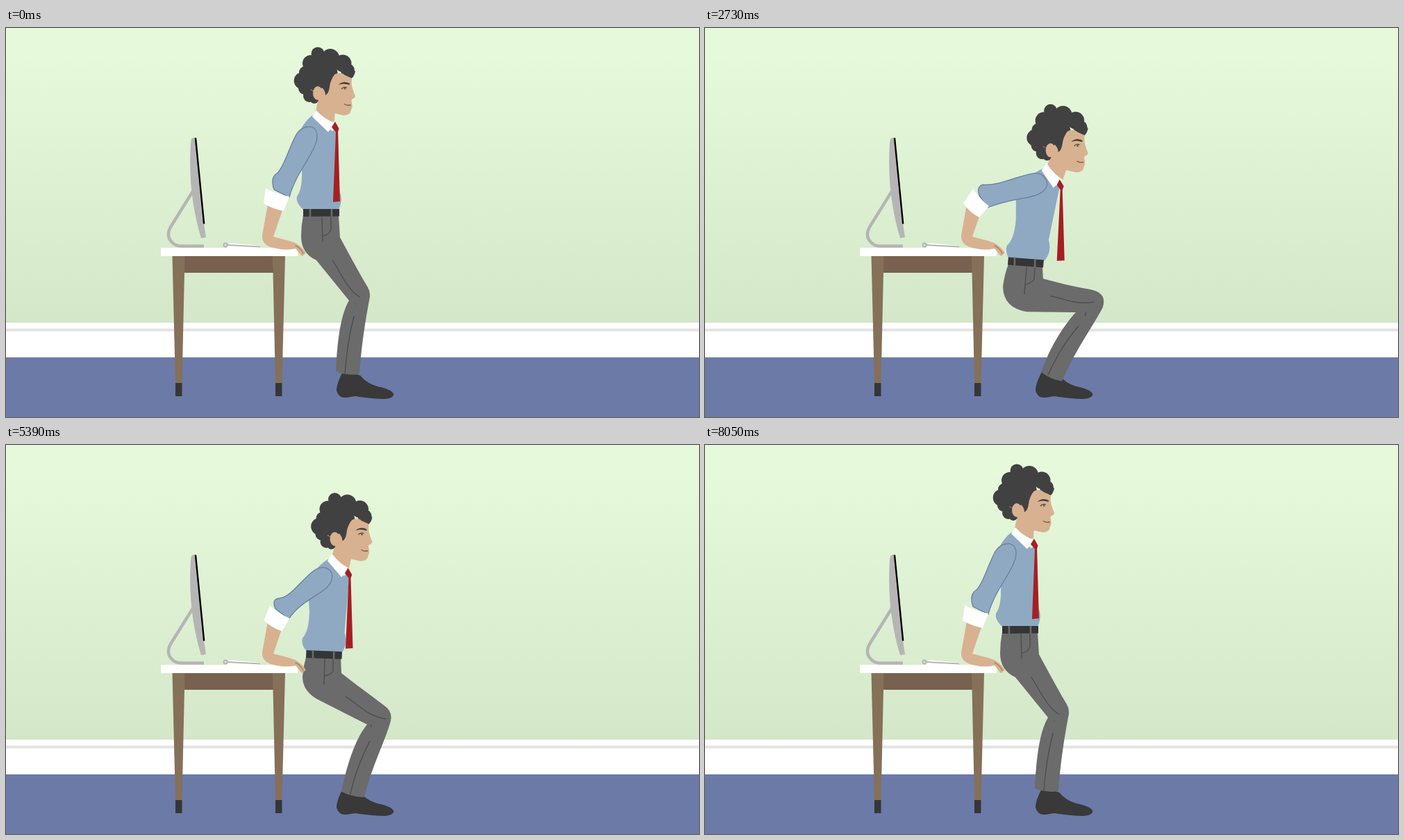
Recreate the animation shown at these times as an HTML page. Size 998 by 561 pixels, loop 8260 ms.

```html
<!DOCTYPE html>
<html lang="en">
<head>
<meta charset="utf-8">
<title>Desk dips</title>
<style>
  html, body { margin: 0; width: 100%; height: 100%; overflow: hidden; }
  svg { display: block; width: 998px; height: 561px; }
  .skin { fill: #d8b190; }
  .hair { fill: #424142; }
  .white { fill: #fff; }
  .shirt { fill: #8fa9c3; }
  .sleeve { fill: #8fa9c3; stroke: #667f9d; stroke-width: 1.3; }
  .trousers { fill: #6b6b6b; }
  .crease { fill: none; stroke: #4c4c4c; stroke-width: 1.3; stroke-linecap: round; }
  .belt { fill: #343536; }
  .loop { fill: none; stroke: #6b6b6b; stroke-width: 2.6; }
  .tie { fill: #a51f24; }
  .leg { fill: #85705a; }
  .line { fill: none; stroke: #9f7355; stroke-width: 1.2; stroke-linecap: round; }
</style>
</head>
<body>
<svg viewBox="0 0 998 561">
  <defs>
    <linearGradient id="wall" x2="0" y2="1">
      <stop offset=".1" stop-color="#e6f9db"/>
      <stop offset="1" stop-color="#d4e7c9"/>
    </linearGradient>
  </defs>
  <rect width="998" height="426" fill="url(#wall)"/>
  <rect y="425" width="998" height="50" class="white"/>
  <rect y="433.5" width="998" height="4" fill="#e4e4e4"/>
  <rect y="475" width="998" height="86" fill="#6c7aa8"/>

  <g id="desk">
    <path d="M257 329H385V353H257Z" fill="#78614f"/>
    <path class="leg" d="M239.500 329H257.500L253.500 512H244ZM384 329H402L397.500 512H388Z"/>
    <path d="M244 512H253.500V531H244ZM388 512H397.500V531H388Z" fill="#363636"/>
    <path class="white" d="M223 317H420V329H223ZM322 310L366 314V317H318Z"/>
    <path d="M270 234L237 287Q230 300 239 309Q244 314.500 252 314.500H285" fill="none" stroke="#b5b5b5" stroke-width="4.500"/>
    <path d="M267 160Q270 157 273 159L285 282L288 302L281 303C268 260 263 215 266 166Z" fill="#b5b5b5"/>
    <path d="M273 158.500L285.200 282.500" stroke="#000" stroke-width="2.400"/>
    <path d="M319 313L366 315.500" stroke="#b5b5b5" stroke-width="2"/>
    <circle cx="316" cy="313" r="2.600" fill="#ddd" stroke="#b0b0b0" stroke-width="1.600"/>
  </g>

  <path d="M486 494Q476 512 476 523Q479 534 490 533L503 531Q525 535 545 535Q558 534 558.500 528Q556 522 540 518Q522 515 510 501Z" fill="#393939"/>
  <g id="body"></g>

  <g id="forearm">
    <path class="skin" d="M377 254L399 260L385 301L408 307Q423 311 431 323Q432 327 429 326Q429 330 425 328L417 318Q404 321 390 318Q368 315 369 299Z"/>
    <path class="line" d="M417 314Q424 317 428 325"/>
  </g>
  <g id="cuff"></g>

  <g id="head">
    <g class="hair">
      <circle cx="449" cy="37" r="9.500"/><circle cx="467" cy="43" r="13"/>
      <circle cx="485" cy="51" r="12.500"/><circle cx="492" cy="61" r="10"/>
      <circle cx="439" cy="51" r="12"/><circle cx="431" cy="64" r="9"/>
      <circle cx="427" cy="76" r="12.300"/><circle cx="430" cy="87" r="9"/>
      <circle cx="437" cy="98" r="9"/><circle cx="444" cy="103" r="6"/>
      <circle cx="453" cy="68" r="25"/>
    </g>
    <path class="skin" d="M460 80L473 67Q482 62 488 68L498 72Q497 82 499 87Q501 94 503 98Q502 102 498 102.500L497.500 106Q500 113 497 118Q496 126 486 126L473 123Q462 122 450 110V92Z"/>
    <path class="hair" d="M452 80L474 66Q467 75 466 85Q465 94 460 97Q460 90 454 85ZM478.500 82Q486 75 495 80L494.500 82Q486 79 478.500 82Z"/>
    <path class="hair" d="M484 63L503 62Q502 69 498 72.500Q491 70 484 63Z"/>
    <ellipse class="skin" cx="449" cy="94" rx="7" ry="10"/>
    <path d="M483 88Q486 84 491 86" fill="none" stroke="#4b4a3c" stroke-width="1.300"/>
    <circle cx="488" cy="87.300" r="1.500" fill="#57694a"/>
    <path d="M487 109.500Q491 112.500 496.500 111" fill="none" stroke="#7d5a45" stroke-width="1.400"/>
  </g>
</svg>
<script>
// Each part: class, standing pose, [halfway pose], lowest pose
const bodyParts = [
  ['trousers',
    'M428 270L479 270L481 302C495 328 508 352 521 374Q526 382 523 393C518 420 512 455 509 499Q492 502 475 495C477 455 481 415 494 393L447 335Q425 325 425 300Q425 285 428 270Z',
    'M432 306L482 306L483 329C502 344 524 360 545 376Q557 384 554 398C545 430 528 460 516 508Q500 508 483 500C490 465 502 425 520 403L453 369Q427 357 427 334Q428 320 432 306Z',
    'M437 341L486 345L487 362C507 367 528 373 555 377Q580 382 573 403C556 435 537 458 514 509Q498 507 484 496C495 465 512 435 534 410L464 410Q430 405 429 374Q431 357 437 341Z'],
  ['crease',
    'M470 335C482 352 489 374 509 388M488 499Q491 455 501 416M455 273L456 308M468 273L468 290Q467 297 457 300',
    'M489 363C508 374 520 391 547 395M496 503Q505 463 524 427M459 308L458 345M471 308L471 326Q470 330 459 333',
    'M498 387C520 391 535 400 560 395M494 500Q513 458 538 430M463 346L460 384M475 347L474 363Q472 367 461 371'],
  ['crease', 'M503 398L503 398', 'M549 410L548 415'],
  ['shirt',
    'M441 126L470 149L478 142L480 235Q486 247 479 262L428 262Q417 252 419 243Q427 232 426 205L420 160Q424 140 441 126Z',
    'M487 203L503 229L512 225L495 306Q500 324 489 336L437 332Q432 322 435 314Q446 305 448 275L448 240Q465 213 487 203Z'],
  ['belt', 'M428 261L480 261L480 271.500L428 272Z', 'M437 331L488 335L487 346L436 342Z'],
  ['loop', 'M438 261L438 272M469 261L469 272', 'M446 331L446 343M475.500 334L475 346'],
  ['skin', 'M450 100L474 115L473 134L462 140L446 121Z', 'M499 183L523 198L516 219L508 224L492 202Z'],
  ['white', 'M447 119L441 128L464 150L474 137Q459 132 447 119Z', 'M492 195L485 206L502 231L515 219Q502 211 492 195Z'],
  ['tie',
    'M474 135L479.500 145L478 150L481 250L471 251L475 150L469 143Z',
    'M511 219L517 229L515 234L518 336L507 336.500L512 234L507 227Z'],
  ['sleeve',
    'M386 233Q380 215 391 209C402 198 408 170 419 152C428 139 448 138 448 156C448 178 418 206 408 244Z',
    'M388 236Q382 222 394 221C412 218 425 194 445 180C460 172 473 180 469 195C462 215 428 220 407 251Z',
    'M396 243Q390 230 400 226C425 228 450 213 474 210C490 209 497 224 491 232C480 248 450 243 407 259Z'],
];
const cuffParts = [
  ['white', 'M374 231Q390 240 408 243L400 264Q384 261 371 253Z', 'M386 232Q396 247 409 257L395 273Q382 267 372 253Z'],
];

const NUMBER = /\d+(\.\d+)?/g;
const numbers = path => path.match(NUMBER).map(Number);

function addParts(parts, id) {
  return parts.map(([cls, ...poses]) => {
    const el = document.createElementNS('http://www.w3.org/2000/svg', 'path');
    el.setAttribute('class', cls);
    document.getElementById(id).append(el);
    const up = numbers(poses[0]), down = numbers(poses[poses.length - 1]);
    const mid = poses[2] ? numbers(poses[1]) : up.map((v, i) => (v + down[i]) / 2);
    return { el, shape: poses[0], up, mid, down };
  });
}

const parts = [...addParts(bodyParts, 'body'), ...addParts(cuffParts, 'cuff')];
const head = document.getElementById('head');

function pose(p) {
  const a = (1 - p) * (1 - 2 * p), b = 4 * p * (1 - p), c = p * (2 * p - 1);
  for (const { el, shape, up, mid, down } of parts) {
    let i = 0;
    el.setAttribute('d', shape.replace(NUMBER, () => {
      const v = a * up[i] + b * mid[i] + c * down[i];
      i++;
      return v.toFixed(2);
    }));
  }
  head.setAttribute('transform', `translate(${49 * p} ${83 * p})`);
}

const REP = 4130, STEP = 70, STEPS = 18;

// Sine-eased progress of a move, advancing in discrete steps
function move(t, start) {
  const k = Math.min(STEPS, Math.max(0, Math.floor((t - start) / STEP) + 1));
  return (1 - Math.cos(Math.PI * k / STEPS)) / 2;
}

function frame() {
  const t = performance.now() % REP;
  pose(move(t, 700) - move(t, 2730));
  requestAnimationFrame(frame);
}
frame();
</script>
</body>
</html>
```
